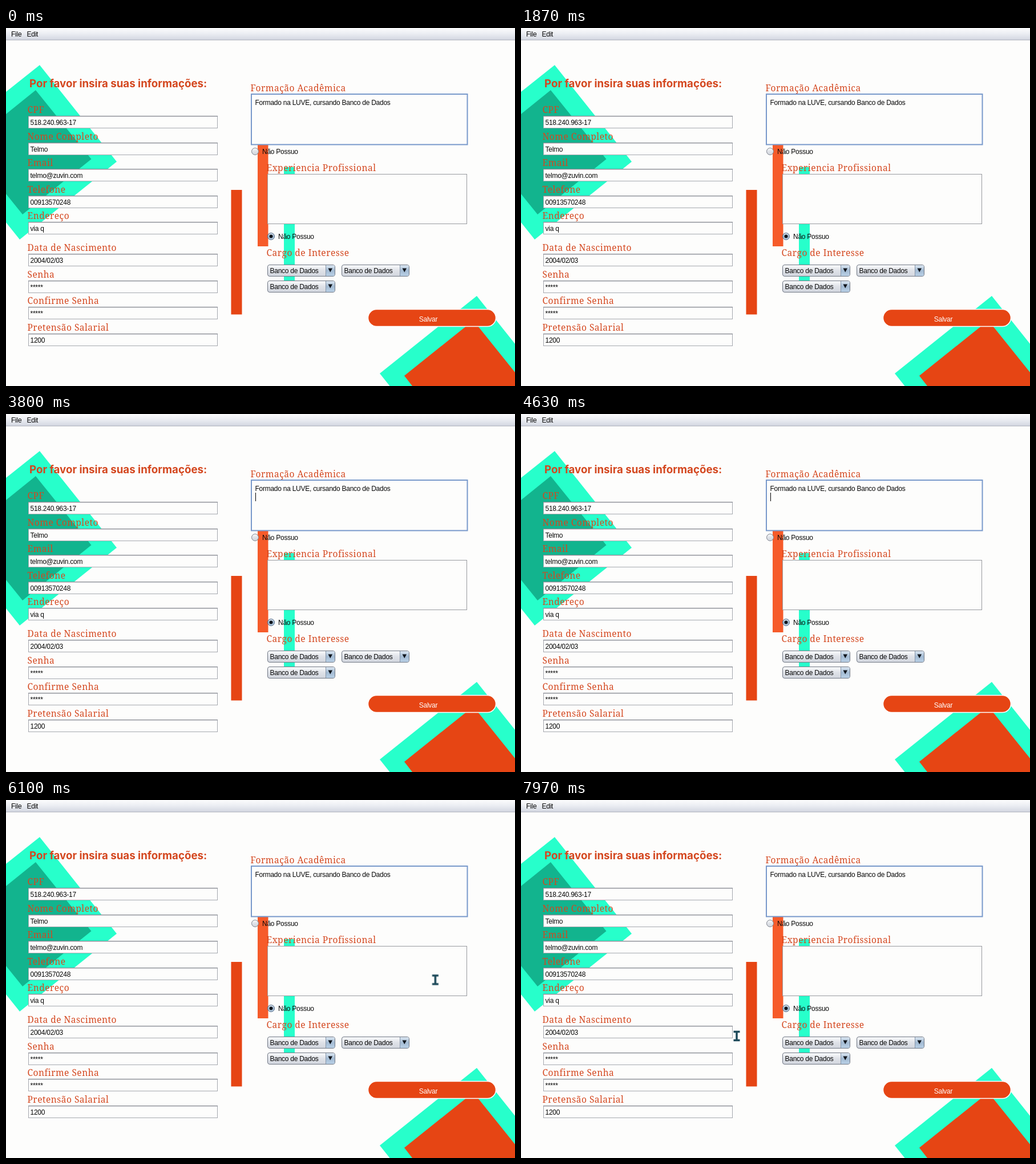
Recreate the animation shown at these times as an HTML page. Size 892 by 628 pixels, loop 8 s.

```html
<!DOCTYPE html>
<html lang="pt">
<head>
<meta charset="utf-8">
<title>Cadastro</title>
<style>
html, body { margin: 0; width: 100%; height: 100%; overflow: hidden; background: #fdfdfc; }
svg { display: block; width: 892px; height: 628px; }
text { font: 12px "Liberation Sans", Arial, sans-serif; letter-spacing: -.26px; fill: #080808; white-space: pre; }
.label { font: 500 15.5px "Noto Serif", serif; letter-spacing: .5px; fill: #d4471f; }
.title { font: 700 18.7px Inter, sans-serif; letter-spacing: 0; fill: #d4471f; }
.teal { fill: #27ffcb; }
.red { fill: #e64514; }
.caret { animation: blink 8s step-end infinite; }
.pointer { animation: move 8s linear infinite, appear 8s step-end infinite; }
.arrow { animation: arrow 8s step-end infinite; }
.beam { animation: beam 8s step-end infinite; }
@keyframes blink {
  0%, 11.6%, 22.9%, 35.4%, 51.2%, 60.4%, 72.5%, 85%, 97.5%, 100% { opacity: 0; }
  5%, 16.6%, 29.1%, 41.6%, 54.1%, 66.2%, 78.7%, 91.1% { opacity: 1; }
}
@keyframes move {
  0%, 61.7% { transform: translate(892px, 190px); }
  66.25% { transform: translate(535px, 106px); }
  76.25% { transform: translate(752.5px, 315.5px); }
  91.25% { transform: translate(581px, 190.5px); }
  97% { transform: translate(345px, 405px); }
  99.6%, 100% { transform: translate(378px, 414px); }
}
@keyframes appear { 0% { opacity: 0; } 61.7%, 100% { opacity: 1; } }
@keyframes arrow {
  0%, 71%, 83.3%, 91.8% { opacity: 1; }
  66.7%, 73.4%, 89.4%, 96.4%, 100% { opacity: 0; }
}
@keyframes beam {
  0%, 71%, 83.3%, 91.8% { opacity: 0; }
  66.7%, 73.4%, 89.4%, 96.4%, 100% { opacity: 1; }
}
</style>
</head>
<body>
<svg viewBox="0 0 892 628">
  <defs>
    <linearGradient id="bar" x2="0" y2="1">
      <stop stop-color="#fcfcfd"/><stop offset=".45" stop-color="#eceef3"/><stop offset="1" stop-color="#d3d7e1"/>
    </linearGradient>
    <linearGradient id="metal" x2="0" y2="1">
      <stop stop-color="#fafbfc"/><stop offset=".5" stop-color="#dfe2e8"/><stop offset="1" stop-color="#d2d6de"/>
    </linearGradient>
    <linearGradient id="blue" x2="0" y2="1">
      <stop stop-color="#dce7f2"/><stop offset=".5" stop-color="#a3bbd3"/><stop offset="1" stop-color="#b9d0e6"/>
    </linearGradient>
  </defs>
  <rect width="892" height="628" fill="#fdfdfc"/>
  <rect width="892" height="21" fill="url(#bar)"/>
  <rect y="20.5" width="892" height="1" fill="#a9aeba"/>
  <text x="9" y="15">File</text>
  <text x="36.5" y="15">Edit</text>

  <path class="teal" d="M59 65L194 234.5L24 371L0 341V112Z"/>
  <path fill="#12b48e" d="M52 109L149.5 230L29 327L0 291V151Z"/>
  <path class="teal" d="M825 470L655 606L672.5 628H892V554Z"/>
  <path class="red" d="M819 513L698 610L712 628H892V604Z"/>
  <rect class="red" x="394.5" y="284" width="19" height="218.5"/>
  <rect class="teal" x="487" y="244" width="19" height="199"/>
  <rect fill="#f65b2a" x="441" y="200" width="18.5" height="183"/>

  <text class="title" x="41" y="104">Por favor insira suas informações:</text>
  <g id="form"></g>

  <text class="label" x="428.5" y="110.5">Formação Acadêmica</text>
  <rect x="430" y="116" width="378.5" height="88.5" fill="#fdfdfc" stroke="#7899cb" stroke-width="2"/>
  <text x="436.5" y="135">Formado na LUVE, cursando Banco de Dados</text>
  <rect class="caret" x="437" y="138" width="1" height="15" fill="#000"/>

  <circle cx="436.5" cy="216.5" r="6" fill="url(#metal)" stroke="#7d828c"/>
  <text x="449" y="221">Não Possuo</text>

  <text class="label" x="456.5" y="250.5">Experiencia Profissional</text>
  <rect x="458.5" y="256.5" width="349" height="87" fill="#fdfdfc" stroke="#989a9f"/>
  <circle cx="464.5" cy="365.5" r="6" fill="url(#blue)" stroke="#4f6580"/>
  <circle cx="464.5" cy="365.5" r="3" fill="#10151c"/>
  <text x="477" y="370">Não Possuo</text>
  <text class="label" x="456.5" y="399.5">Cargo de Interesse</text>
  <g id="combos"></g>

  <rect class="red" x="634.5" y="493.5" width="224" height="30" rx="15" stroke="#fff" stroke-width="1.5"/>
  <text x="740" y="515" text-anchor="middle" style="fill:#fff">Salvar</text>

  <g class="pointer">
    <path class="arrow" d="M0 0V16L4 12.5L6.5 18L9.5 16.7L7 11.5H12Z" fill="#25c2ea" stroke="#18394a" stroke-width="1.2"/>
    <path class="beam" d="M-5.5-7.5H5.5M-5.5 7.5H5.5M0-7.5V7.5" fill="none" stroke="#1d4a5a" stroke-width="3.5"/>
  </g>
</svg>
<script>
const fields = [
  ["CPF", "518.240.963-17"],
  ["Nome Completo", "Telmo"],
  ["Email", "telmo@zuvin.com"],
  ["Telefone", "00913570248"],
  ["Endereço", "via q"],
  ["Data de Nascimento", "2004/02/03"],
  ["Senha", "*****"],
  ["Confirme Senha", "*****"],
  ["Pretensão Salarial", "1200"]
];

const field = ([label, value], i) => {
  const y = Math.round(154 + i * 46.55 + (i > 4 ? 9.5 : 0));
  return `<text class="label" x="37.5" y="${y - 5.5}">${label}</text>
    <rect x="39.5" y="${y + .5}" width="331" height="21" fill="#fdfdfc" stroke="#a5a8af"/>
    <path d="M39 ${y + .5}H371" stroke="#85888f"/>
    <path d="M40 ${y + 1.5}H370" stroke="#d5d6da"/>
    <text x="42.5" y="${y + 16}">${value}</text>`;
};

const combo = ([x, y]) => `<g transform="translate(${x} ${y})">
    <rect x=".5" y=".5" width="118" height="20" rx="3.5" fill="url(#metal)" stroke="#707784"/>
    <path d="M102 1H115Q118 1 118 4V17Q118 20 115 20H102Z" fill="url(#blue)"/>
    <path d="M102.5 1V20" stroke="#8796aa"/>
    <path d="M106.5 6.5H114L110.25 13.5Z" fill="#10151c"/>
    <text x="4.5" y="15">Banco de Dados</text>
  </g>`;

document.getElementById("form").innerHTML = fields.map(field).join("");
document.getElementById("combos").innerHTML = [[458, 415], [588, 415], [458, 443]].map(combo).join("");
</script>
</body>
</html>
```
